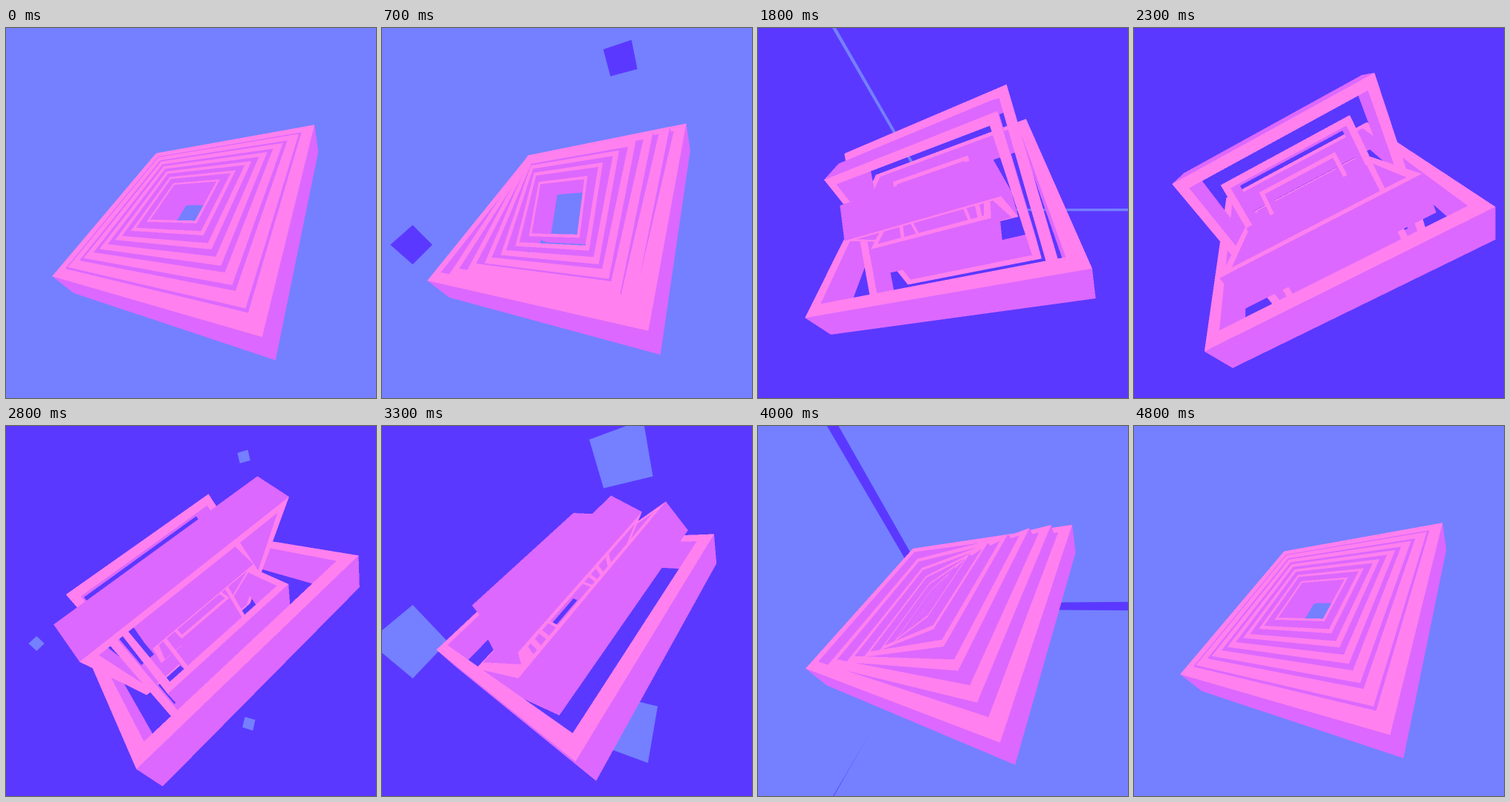
Write an HTML page with a canvas that moves like this. It is 498 by 498 pixels and loops after 4900 ms.

```html
<!DOCTYPE html>
<html lang="en">
<head>
<meta charset="utf-8">
<title>Folding frames</title>
<style>
  html, body { margin: 0; width: 100%; height: 100%; overflow: hidden; background: #7480ff; }
  canvas { display: block; width: 498px; height: 498px; }
</style>
</head>
<body>
<canvas id="stage" width="498" height="498"></canvas>
<script>
const SIZE = 498, MID = 247.5, SS = 2, BIG = SIZE * SS;
const LOOP = 4900, STEP = 100, TURN = 4800, HALF = TURN / 2;
const LIGHT = '#7480ff', DARK = '#5b38ff';

// Isometric perspective camera
const ZOOM = 485, DIST = 4.27, WALL = 3.1;

// Nested rings
const RINGS = 7, SHRINK = 0.12, RIM = 0.1, THICK = 0.15;

// Wall tile size over half a turn: [ms, size]
const GROWTH = [[0, 0], [300, .015], [600, .055], [750, .085], [900, .14], [1050, .33],
  [1200, .565], [1400, .83], [1600, .965], [1800, .99], [2100, 1]];
// Sideways drift of each wall tile while it grows
const DRIFT = [[-.05, 1], [-.65, -.65], [-.5, -.52]];

const ctx = document.getElementById('stage').getContext('2d');
const layer = document.createElement('canvas');
layer.width = layer.height = BIG;
const layerCtx = layer.getContext('2d');
const image = layerCtx.createImageData(BIG, BIG);
const pixels = new Uint32Array(image.data.buffer);
const depth = new Float32Array(BIG * BIG);

const abgr = (r, g, b) => (0xff000000 | b << 16 | g << 8 | r) >>> 0;
const PINK = abgr(255, 128, 238), VIOLET = abgr(220, 104, 255);

// Each axis runs toward the viewer, at 0, 120 and 240 degrees on screen
function project([a, b, c]) {
  const q = 1 / (DIST - a - b - c);
  return [MID + ZOOM * (a - (b + c) / 2) * q, MID + ZOOM * Math.sqrt(3) / 2 * (b - c) * q, q];
}

// Symmetric cubic-bezier(h, 0, 1 - h, 1), solved by bisection
function ease(x, h = 0.57) {
  let low = 0, high = 1;
  for (let i = 0; i < 30; i++) {
    const s = (low + high) / 2, r = 1 - s;
    if (3 * h * s * r * r + 3 * (1 - h) * s * s * r + s ** 3 < x) low = s;
    else high = s;
  }
  return high * high * (3 - 2 * high);
}

function lookup(table, t) {
  for (let i = 1; i < table.length; i++) {
    const [t0, v0] = table[i - 1], [t1, v1] = table[i];
    if (t < t1) return v0 + (v1 - v0) * (t - t0) / (t1 - t0);
  }
  return table[table.length - 1][1];
}

function drawWalls(t) {
  const second = t >= HALF;
  const size = lookup(GROWTH, t - (second ? HALF : 0));
  const [base, tile] = second ? [DARK, LIGHT] : [LIGHT, DARK];
  ctx.fillStyle = size >= 1 ? tile : base;
  ctx.fillRect(0, 0, SIZE, SIZE);
  if (size <= 0 || size >= 1) return;

  const reach = size * WALL, slip = 46 * Math.sqrt(1 - size);
  ctx.fillStyle = tile;
  DRIFT.forEach(([dx, dy], face) => {
    ctx.beginPath();
    for (const [m, n] of [[-1, -1], [-1, 1], [1, 1], [1, -1]]) {
      const point = [];
      point[face] = -WALL;
      point[(face + 1) % 3] = m * reach;
      point[(face + 2) % 3] = n * reach;
      const [x, y] = project(point);
      ctx.lineTo(x + dx * slip, y + dy * slip);
    }
    ctx.fill();
  });
}

// Scanline fill of a convex polygon with a depth test
function fillFace(points, color) {
  const pts = points.map(([x, y, q]) => [x * SS, y * SS, q]);
  const ys = pts.map(p => p[1]);
  const top = Math.max(0, Math.ceil(Math.min(...ys) - .5));
  const bottom = Math.min(BIG - 1, Math.floor(Math.max(...ys) - .5));
  for (let y = top; y <= bottom; y++) {
    const yc = y + .5;
    let left = Infinity, right = -Infinity, ql = 0, qr = 0;
    for (let i = 0; i < pts.length; i++) {
      const a = pts[i], b = pts[(i + 1) % pts.length];
      if ((a[1] <= yc) === (b[1] <= yc)) continue;
      const k = (yc - a[1]) / (b[1] - a[1]);
      const x = a[0] + k * (b[0] - a[0]), q = a[2] + k * (b[2] - a[2]);
      if (x < left) { left = x; ql = q; }
      if (x > right) { right = x; qr = q; }
    }
    if (!(right > left)) continue;
    const slope = (qr - ql) / (right - left);
    const from = Math.max(0, Math.ceil(left - .5));
    const to = Math.min(BIG - 1, Math.floor(right - .5));
    for (let x = from; x <= to; x++) {
      const q = ql + slope * (x + .5 - left), i = y * BIG + x;
      if (q > depth[i]) { depth[i] = q; pixels[i] = color; }
    }
  }
}

function drawRing(index, e) {
  const spin = -Math.PI / 2 * e, tilt = index * Math.PI * e;
  const cs = Math.cos(spin), sn = Math.sin(spin), ct = Math.cos(tilt), st = Math.sin(tilt);
  const u = [cs, sn, 0];
  const v = [-sn * ct, cs * ct, -st];
  const n = [-sn * st, cs * st, ct];
  const outer = 1 - SHRINK * index, inner = outer * (1 - RIM);
  const square = (half, z) => [[-1, -1], [1, -1], [1, 1], [-1, 1]].map(([x, y]) =>
    project(u.map((_, i) => half * (x * u[i] + y * v[i]) + z * n[i])));

  const frontOut = square(outer, THICK), frontIn = square(inner, THICK);
  const backOut = square(outer, -THICK), backIn = square(inner, -THICK);
  const band = (p, q, color) => {
    for (let i = 0; i < 4; i++) {
      const j = (i + 1) % 4;
      fillFace([p[i], p[j], q[j], q[i]], color);
    }
  };
  band(frontOut, frontIn, PINK);
  band(backOut, backIn, PINK);
  band(frontOut, backOut, VIOLET);
  band(frontIn, backIn, VIOLET);
}

function draw(t) {
  drawWalls(t);
  pixels.fill(0);
  depth.fill(0);
  const e = ease(t / TURN);
  for (let i = 0; i < RINGS; i++) drawRing(i, e);
  layerCtx.putImageData(image, 0, 0);
  ctx.drawImage(layer, 0, 0, SIZE, SIZE);
}

let start = null, shown = -1;
function tick() {
  const now = performance.now();
  if (start === null) start = now;
  const t = Math.floor((now - start) % LOOP / STEP) * STEP;
  if (t !== shown) draw(shown = t);
  requestAnimationFrame(tick);
}
tick();
</script>
</body>
</html>
```
